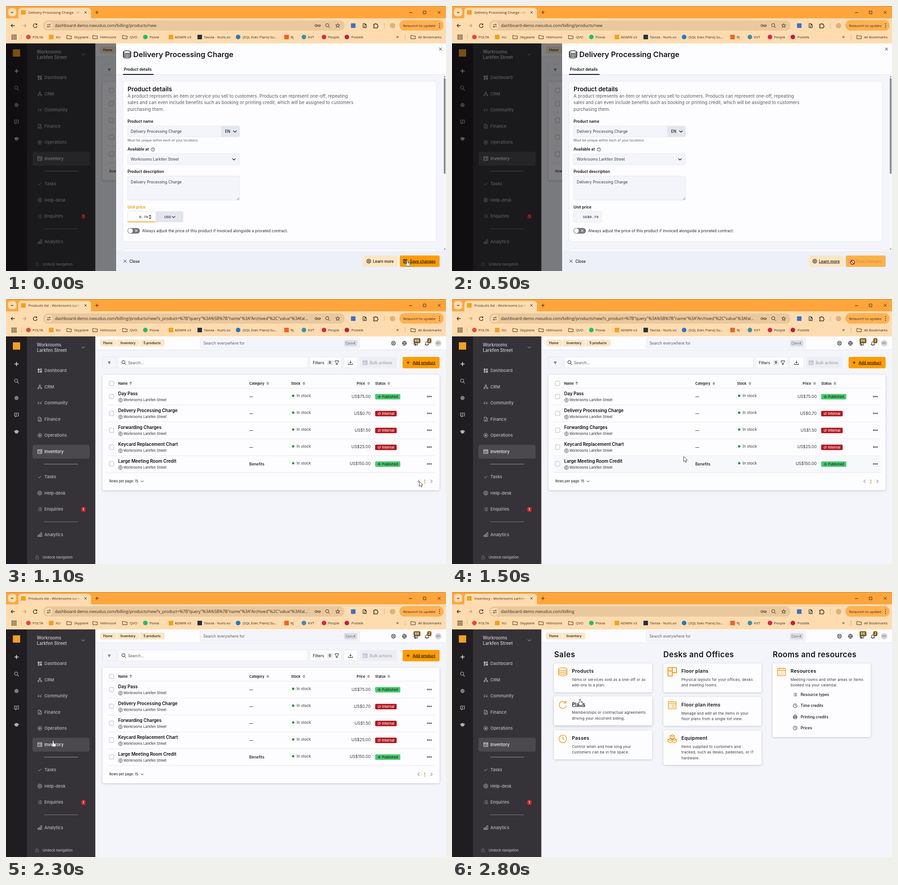
An HTML page that plays this animation: 963x581 px, repeating every 3 s.

```html
<!DOCTYPE html>
<html lang="en">
<head>
<meta charset="utf-8">
<title>Dashboard</title>
<style>
html, body { margin: 0; width: 100%; height: 100%; overflow: hidden; background: #f4f5fb }
svg { display: block; width: 963px; height: 581px }
text { font-family: Inter, sans-serif; white-space: pre }
.ui { font-family: "Open Sans", "Noto Sans", sans-serif }
.mono { font-family: "Liberation Mono", monospace }
.wide { letter-spacing: .025em }
.card { filter: drop-shadow(0 1.5px 2px #0003) }
.lift { filter: drop-shadow(0 2.5px 3px #0003) }
</style>
</head>
<body>
<svg id="stage" viewBox="0 0 963 581"></svg>
<script>
const LOOP = 3000, STEP = 100;
const SAVING = 200, SAVED = 600, INVENTORY = 2400, RETITLED = 2500;
const INK = '#141316', GREY = '#5c5b60', ORANGE = '#ff9d00', WHITE = '#fdfcff', PAGE = '#f4f5fb', EDGE = '#e3e4ea', BAR = '#ffdcb0';
const SITE = 'Workrooms Larkfen Street';

// y is the middle of the capitals
const text = (x, y, s, size, fill = INK, weight = 400, more = '') =>
  `<text x="${x}" y="${y + size * .364}" font-size="${size}" fill="${fill}" font-weight="${weight}" ${more}>${s}</text>`;
const ui = (x, y, s, size, fill = '#38291a') => text(x, y, s, size, fill, 400, 'class="ui"');
const rect = (x, y, w, h, fill, r = 0, more = '') =>
  `<rect x="${x}" y="${y}" width="${w}" height="${h}" fill="${fill}" rx="${r}" ${more}/>`;
const box = (x, y, w, h, fill = PAGE, r = 3) => rect(x, y, w, h, fill, r, `stroke="${EDGE}" stroke-width=".8"`);
const circle = (x, y, r, fill, more = '') => `<circle cx="${x}" cy="${y}" r="${r}" fill="${fill}" ${more}/>`;
const line = (d, stroke = INK, width = 1, fill = 'none') =>
  `<path d="${d}" stroke="${stroke}" stroke-width="${width}" fill="${fill}" stroke-linejoin="round"/>`;
const ring = r => `M${-r} 0a${r} ${r} 0 1 0 ${2 * r} 0a${r} ${r} 0 1 0 ${-2 * r} 0`;
const underline = 'text-decoration="underline"';

const ICONS = {
  grid: 'M-4-4h3v4h-3zM1-4h3v2h-3zM-4 2h3v2h-3zM1 0h3v4h-3z',
  org: 'M-1.5-4h3v2.5h-3zM-4.2 2h2.4v2.4h-2.4zM1.8 2h2.4v2.4h-2.4zM0-1.5v2M-3 2v-1.5h6v1.5',
  quote: 'M-1-3q-3 1-3 4a1.2 1.2 0 1 0 2-1M4-3q-3 1-3 4a1.2 1.2 0 1 0 2-1',
  doc: 'M-3.5-4.5h4l3 3v6h-7zM.5-4.5v3h3M-1.5 1h3M-1.5 3h3',
  dot: ring(4.4) + ring(1.8) + ring(.8),
  table: 'M-4.5-4.2h9v8.4h-9zM-4.5-2h9M-2.8 0h1M-.5 0h3.5M-2.8 2.2h1M-.5 2.2h3.5',
  check: 'M-3.5 0l2.3 2.3l4.6-4.6',
  buoy: ring(4.5) + ring(2) + 'M-3.1-3.1l1.7 1.7M3.1-3.1l-1.7 1.7M-3.1 3.1l1.7-1.7M3.1 3.1l-1.7-1.7',
  list: 'M-4-3h1M-4 0h1M-4 3h1M-1.5-3h5.7M-1.5 0h5.7M-1.5 3h5.7',
  chart: 'M-4.3 4.3v-3h2.4v3zM-1.2 4.3v-5h2.4v5zM1.9 4.3v-8.6h2.4v8.6z',
  lock: 'M-3.5-.5h7v5h-7zM-2-.5v-2a2 2 0 0 1 4 0v2',
  plus: 'M-4.5 0h9M0-4.5v9',
  cross: 'M-3-3l6 6M3-3l-6 6',
  search: 'M-4.5-1a3.5 3.5 0 1 0 7 0a3.5 3.5 0 1 0-7 0M1.5 1.7l3.3 3.3',
  gear: ring(3.4) + ring(1.4) + 'M0-4.6v1.2M0 3.4v1.2M-4.6 0h1.2M3.4 0h1.2M-3.2-3.2l.8.8M3.2 3.2l-.8-.8M-3.2 3.2l.8-.8M3.2-3.2l-.8.8',
  chat: 'M-4.5-4h9v6.5h-4.5l-2 2v-2h-2.5zM-2-1.8h4M-2 .3h2.5',
  cap: 'M-5-1l5-2.2l5 2.2l-5 2.2zM-3 0v2.5q3 1.5 6 0v-2.5',
  down: 'M-3.5-1.7l3.5 3.4l3.5-3.4',
  left: 'M2-3.5l-4 3.5l4 3.5', right: 'M-2-3.5l4 3.5l-4 3.5',
  back: 'M4 0h-8M-.5-3.5l-3.5 3.5l3.5 3.5', next: 'M-4 0h8M.5-3.5l3.5 3.5l-3.5 3.5',
  up: 'M0 3.5v-7M-3-.5l3-3l3 3',
  sort: 'M-2.5-1l2.5-2.5l2.5 2.5zM-2.5 1l2.5 2.5l2.5-2.5z',
  reload: 'M3.3-2.4a4.2 4.2 0 1 0 .8 3.4M3.6-4.6v2.6h-2.6',
  folder: 'M-5-3.5h3.5l1.3 1.3h5.2v6h-10z',
  star: 'M0-4.5l1.3 3h3.2l-2.5 2.1l.9 3.4l-2.9-1.9l-2.9 1.9l.9-3.4l-2.5-2.1h3.2z',
  key: 'M-6 0a2.3 2.3 0 1 0 4.6 0a2.3 2.3 0 1 0-4.6 0M-1.4-1.2h7.4v2.4h-1.5v1h-2v-1h-3.9',
  puzzle: 'M-4.5-3h3a1.5 1.5 0 0 1 3 0h2.5v3a1.5 1.5 0 0 1 0 3v2h-8.5v-2.5a1.5 1.5 0 0 0 0-3z',
  funnel: 'M-4-4h8v1.8l-2.8 2.7v3.5h-2.4v-3.5l-2.8-2.7z',
  filter: 'M-3-2h6M-1.8 0h3.6M-.7 2h1.4',
  load: 'M0-4.5v6M-2.5-1l2.5 2.5l2.5-2.5M-4.5 2v2h9v-2',
  globe: ring(4.5) + 'M-4.5 0h9M0-4.5q-4 4.5 0 9q4-4.5 0-9',
  horn: 'M-4.5-1h3l5-3v8l-5-3h-3zM-3 1l1 3.5h1.5l-.8-3.5',
  bell: 'M-4 2.5q1.3-1 1.3-4a2.7 2.7 0 0 1 5.4 0q0 3 1.3 4zM-1 3.8q1 1 2 0',
  pin: ring(4.3) + 'M0 3q-4-4 0-5.5q4 1.5 0 5.5M-.5-.5h1',
  eye: 'M-4 0q4-5 8 0q-4 5-8 0M-1.2 0a1.2 1.2 0 1 0 2.4 0a1.2 1.2 0 1 0-2.4 0',
  noeye: 'M-4 0q4-5 8 0q-4 5-8 0M-3 3l6-6',
  db: 'M-5-3a5 1.8 0 1 0 10 0a5 1.8 0 1 0-10 0v6a5 1.8 0 0 0 10 0v-6M-5-1a5 1.8 0 0 0 10 0M-5 1a5 1.8 0 0 0 10 0',
  plan: 'M-5-5h10v6h-5v4h-5zM0-5v6M-5-1h5',
  clock: ring(4.5) + 'M0-2.8v2.8l2 1',
  cubes: 'M0-5l2.5 1.2v2.6l-2.5 1.2l-2.5-1.2v-2.6zM-2.5-3.8l2.5 1.2l2.5-1.2M-2.5-.5l2.5 1.2v2.6l-2.5 1.2l-2.5-1.2v-2.6zM2.5-.5l2.5 1.2v2.6l-2.5 1.2l-2.5-1.2v-2.6zM0 .7l-2.5 1.2l-2.5-1.2M5 .7l-2.5 1.2l-2.5-1.2',
  calendar: 'M-4.5-4h9v8.5h-9zM-4.5-1.7h9M-2.3-5v2M2.3-5v2M-2.7.3h1M-.5.3h1M1.7.3h1M-2.7 2.4h1M-.5 2.4h1M1.7 2.4h1',
  printer: 'M-2.7-1v-3.5h5.4v3.5M-2.7 2.5h-1.8v-3.5h9v3.5h-1.8M-2.7 1h5.4v3.5h-5.4z',
  disk: 'M-4-4h6.5l1.5 1.5v6.5h-8zM-2-4v2.5h4v-2.5M-2 4v-3.5h4v3.5'
};
const icon = (name, x, y, color = INK, scale = 1, width = 1, fill = 'none') =>
  `<g transform="translate(${x} ${y}) scale(${scale})">${line(ICONS[name], color, width / scale, fill)}</g>`;

function browser(title, url) {
  const dark = '#3d2c18';
  let s = rect(0, 0, 963, 40, '#ffa53b') + rect(0, 0, 963, 1, '#c98b45') + rect(0, 27, 963, 55, BAR) + rect(27, 4, 159, 30, BAR, 7)
    + rect(4.5, 4.5, 18, 18, BAR, 6) + icon('down', 13.5, 14, dark, .7, 1.2) + rect(33, 9, 10, 10, '#f5a01e')
    + `<g clip-path="url(#tab)">${ui(49, 14, title, 7.85)}</g>` + rect(146, 6, 18, 17, 'url(#fade)')
    + icon('cross', 174, 14, dark, .8) + icon('plus', 199, 14, dark, .8, 1.2)
    + line('M882 14.5h7M913 11h6v6h-6z', dark) + icon('cross', 948, 14, dark)
    + icon('back', 15, 43, dark, 1, 1.3) + icon('next', 40, 43, '#b59a77', 1, 1.2) + icon('reload', 64, 43, dark, 1, 1.3)
    + rect(81, 31.5, 660, 22.5, '#eac89e', 11) + circle(93.5, 43, 8, BAR)
    + line('M89.5 40.7h4M97.7 40.7h0M89.5 45.3h1M94.5 45.3h3.5', dark, 1.1) + circle(95.7, 40.7, 1.4, 'none', `stroke="${dark}"`) + circle(92, 45.3, 1.4, 'none', `stroke="${dark}"`)
    + ui(107, 43, url, 9.05) + icon('key', 682, 43, dark) + icon('search', 704, 43, dark) + icon('star', 726, 43, dark)
    + rect(755, 38, 10, 10, '#3b73c8', 1) + icon('doc', 785, 43, dark, 1, 1.2) + icon('puzzle', 809, 43, dark, 1, 1.3)
    + rect(827.5, 37, 1, 12, '#f0ad5c') + circle(846, 43, 6, '#dfb27c')
    + rect(861, 31, 97, 23, '#ffb152', 11.5) + ui(869, 43, 'Relaunch to update', 7.8)
    + [39, 43, 47].map(y => circle(949, y, 1, dark)).join('')
    + [64, 68, 72].map(y => [13.5, 17.5, 21.5].map(x => rect(x - 1.2, y - 1.2, 2.6, 2.6, dark)).join('')).join('')
    + rect(33, 62, 1, 12, '#f0ad5c') + rect(873, 62, 1, 12, '#f0ad5c') + ui(854, 67, '»', 11) + icon('folder', 891, 68, dark) + ui(902, 68, 'All Bookmarks', 7.7);
  const marks = [
    [49, 58, 'POLTA', '#e5483b', 1], [99, 109, 'XU', '#f5a01e'], [138, 149, 'Skyplank'], [195, 206, 'Hillmoore'], [260, 271, 'QVO'],
    [305, 314, 'Plovia', '#1fbf67', 1], [361, 369.5, 'ADMIN v3', '#f5a01e'], [424, 433, 'Tavola - Nurb.xo', '#26333f'],
    [508, 518, '(SQL Exec Plans) Su...', '#2478c8', 1], [614, 623, 'RJ', '#f06423'], [652, 661, 'KVT', '#3a8fb5', 1],
    [696, 705, 'People', '#d8264a', 1], [746, 756, 'Postelk', '#c01f3c', 1]];
  for (const [x, tx, label, color, round] of marks)
    s += (color ? rect(x - 5, 63, 10, 10, color, round ? 5 : 1) : icon('folder', x, 68, dark)) + ui(tx, 68, label, 7.7);
  return s;
}

function sidebar() {
  const soft = '#b8b7bb';
  let s = rect(0, 82, 46, 499, '#201d21') + rect(46, 82, 149.5, 499, '#353337') + rect(58, 319.5, 125, 30.5, '#4b494d', 4)
    + rect(15, 95, 16, 16, '#f5a01e') + icon('plus', 23, 142.5, '#eee', 1, 1.4)
    + ['search', 'gear', 'chat', 'cap'].map((n, i) => icon(n, 23, 180 + i * 37, soft, 1, 1.1, n == 'cap' ? soft : 'none')).join('')
    + text(67.5, 100, 'Workrooms', 9.7, '#cfced2', 500) + text(67.5, 112, 'Larkfen Street', 9.7, '#cfced2', 500) + icon('down', 169, 106, soft);
  const items = [['grid', 157, 'Dashboard'], ['org', 192.5, 'CRM'], ['quote', 228, 'Community'], ['doc', 263.5, 'Finance'], ['dot', 299, 'Operations'],
    ['table', 334.5, 'Inventory'], ['check', 390, 'Tasks'], ['buoy', 425.5, 'Help-desk'], ['list', 461, 'Enquiries'], ['chart', 516.5, 'Analytics']];
  for (const [name, y, label] of items) {
    const color = label == 'Inventory' ? '#f3f2f5' : soft;
    s += icon(name, 74, y, color, 1, .9, name == 'grid' ? color : 'none') + text(84, y, label, 9.3, color, 500);
  }
  return s + rect(83, 361.5, 75, 1, '#9a999d') + rect(83, 488, 75, 1, '#77767a') + rect(165, 456.5, 9, 10, '#d4262e', 2)
    + text(167.6, 461.5, '1', 7, '#fff', 600) + icon('lock', 68, 566, '#77767a', .9, .9) + text(80, 566, 'Undock navigation', 7.4, soft, 500);
}

function header(crumbs) {
  const spans = [[206, 242], [242, 292], [292, 347]], starts = [212.5, 250.5, 301];
  let s = rect(195, 82, 768, 499, PAGE) + rect(195, 82, 768, 29, WHITE) + rect(195, 111, 768, 1, '#e4e5eb');
  crumbs.forEach((label, i) => {
    const [a, b] = spans[i], end = i == crumbs.length - 1;
    s += rect(a, 89, b - a, 15, '#fde6c4', end || !i ? 4 : 0);
    if (i) s += line(`M${a - 2} 88.5l4 8l-4 8`, WHITE, 1.5);
    s += text(starts[i], 96.7, label, 7.3, INK, 500);
  });
  s += box(425, 85, 349, 23) + text(432, 97, 'Search everywhere for', 8.4, GREY) + rect(740, 90, 29, 14, '#dddee5', 2) + text(743, 97, 'Ctrl+K', 7.3, GREY)
    + icon('buoy', 848, 97) + icon('globe', 872, 97) + icon('horn', 897, 98, INK, .9) + icon('bell', 921, 98)
    + circle(946, 97, 7, '#d7d6db') + text(942, 97, 'KO', 5.5, GREY);
  for (const [x, w, n] of [[892, 15, '66'], [922, 9, '2']])
    s += rect(x, 86, w, 11, '#7d5a12', 3) + text(x + w / 2, 91.5, n, 7.3, '#fff', 600, 'text-anchor="middle"');
  return s;
}

const PRODUCTS = [['Day Pass', '75.00', 1], ['Delivery Processing Charge', '0.70'], ['Forwarding Charges', '1.50'], ['Keycard Replacement Chart', '25.00'], ['Large Meeting Room Credit', '150.00', 1, 'Benefits']];

function productList(rows, cursor) {
  const bottom = 195.5 + rows.length * 36.95;
  const check = y => rect(226, y - 5, 10, 10, WHITE, 2, 'stroke="#a9a9b0" stroke-width=".8"');
  let s = header(['Home', 'Inventory', '5 products'])
    + box(211, 127, 30, 24) + icon('filter', 226, 140) + box(246, 127, 414, 24, WHITE) + icon('search', 258, 139.5) + text(267, 139.5, 'Search...', 8.4, GREY)
    + box(665, 127, 69, 24, WHITE) + text(671.5, 139.5, 'Filters', 8.6) + rect(703, 134, 12, 11, '#e6e7ee', 2) + text(706.5, 139.5, '0', 7.3, INK, 600) + icon('funnel', 724, 139.5)
    + box(739, 127, 31, 24, WHITE) + icon('load', 754, 139.5) + rect(775, 127, 80, 24, '#edeef4', 3) + icon('table', 786, 139.5, '#a7a7ad') + text(796, 139.5, 'Bulk actions', 8.5, '#a2a2a8', 500)
    + rect(868, 127, 81, 25, ORANGE, 3) + icon('plus', 880, 139.5, INK, .7, 1.2) + text(890, 139.5, 'Add product', 8.4, INK, 500, underline)
    + rect(211, 166, 738, bottom - 127, WHITE, 4, 'class="card"') + check(185);
  for (const [x, label, mark] of [[245.5, 'Name', 273], [532.5, 'Category', 573], [624, 'Stock', 652], [767.5, 'Price', 793.5], [808, 'Status', 838]])
    s += text(x, 185, label, 7.35, INK, 600) + icon(label == 'Name' ? 'up' : 'sort', mark, 185, label == 'Name' ? INK : GREY, .9, .8);
  s += rect(221, 195, 718, .8, EDGE);
  rows.forEach(([name, price, live, category = '—'], i) => {
    const top = 195.5 + i * 36.95, y = top + 18.3;
    if (cursor.x > 221 && cursor.x < 939 && cursor.y > top && cursor.y < top + 36.95) s += rect(221, top, 718, 37, '#f7f8fb');
    s += check(y) + text(245.5, y - 6.2, name, 9.7, '#0b0a0c', 600) + icon('pin', 250.5, y + 8, INK, 1, .7) + text(257, y + 7.4, SITE, 7.6, '#2b2a2e')
      + text(532.5, y, category, 8.4, INK, 500) + circle(628.5, y - 1.6, 2.6, '#1f9a35') + text(636, y - 1.5, 'In stock', 8.5, '#3a393d')
      + text(798, y - .4, 'US$' + price, 8.9, '#3a393d', 400, 'text-anchor="end"')
      + rect(808, y - 5.5, live ? 55 : 47, 12, live ? '#4dca70' : '#b2171e', 2) + icon(live ? 'eye' : 'noeye', 817, y + .5, live ? '#0c3a1a' : '#fff', .9, .8)
      + text(823, y + .5, live ? 'Published' : 'Internal', 7.45, live ? '#0c2a14' : '#fff', 500)
      + [923, 926.7, 930.4].map(x => circle(x, y, 1.2, 'none', `stroke="${INK}" stroke-width=".9"`)).join('') + rect(221, top + 36.95, 718, .8, EDGE);
  });
  return s + text(226, bottom + 19.5, 'Rows per page: 15', 7.35) + icon('down', 298, bottom + 19.5, INK, .8)
    + icon('left', 903, bottom + 19.5, GREY) + text(914.5, bottom + 19.5, '1', 8.4, '#c99a00', 600, underline) + icon('right', 931, bottom + 19.5, GREY);
}

const CARDS = [
  [223, 156.5, 63.5, 'db', 'Products', 'Items or services sold as a one-off or as|add-ons to a plan.'],
  [223, 230, 63.5, 'reload', 'Plans', 'Memberships or contractual agreements|driving your recurrent billing.'],
  [223, 303.5, 63.5, 'clock', 'Passes', 'Control when and how long your|customers can be in the space.'],
  [462.5, 156.5, 63.5, 'plan', 'Floor plans', 'Physical layouts for your offices, desks|and meeting rooms.'],
  [462.5, 230, 63.5, 'table', 'Floor plan items', 'Manage and edit all the items in your|floor plans from a single list view.'],
  [462.5, 303.5, 75.5, 'cubes', 'Equipment', 'Items supplied to customers and|tracked, such as desks, pedestals, or IT|hardware.'],
  [701.5, 156.5, 161.5, 'calendar', 'Resources', 'Meeting rooms and other areas or items|booked via your calendar.']];
const within = (p, [x, y, h]) => p.x > x && p.x < x + 215 && p.y > y && p.y < y + h;

function inventory(cursor) {
  let s = header(['Home', 'Inventory']);
  for (const [x, label] of [[223.5, 'Sales'], [462.5, 'Desks and Offices'], [702, 'Rooms and resources']])
    s += text(x, 137, label, 16.8, INK, 600, 'class="wide"');
  for (const card of CARDS) {
    const [x, top, h, name, title, body] = card, hot = within(cursor, card), y = top - (hot ? 1.3 : 0);
    s += rect(x, y, 215, h, WHITE, 3, `class="${hot ? 'lift' : 'card'}"`) + icon(name, x + 19.5, y + 18.5, '#f5a01e', 1.85, name == 'plan' ? 2.2 : 1.5)
      + text(x + 39.5, y + 17, title, 10.6, INK, 600, 'class="wide" ' + (hot ? underline : ''))
      + body.split('|').map((row, i) => text(x + 39.5, y + 35.7 + i * 12.3, row, 8.05, '#3a393d', 400, 'class="wide"')).join('');
  }
  [['list', 'Resource types'], ['clock', 'Time credits'], ['printer', 'Printing credits'], ['clock', 'Prices']].forEach(([name, label], i) =>
    s += icon(name, 751, 225 + i * 24.4, INK, .9, .9) + text(763, 225 + i * 24.4, label, 8.4, INK, 500));
  return s;
}

function drawer(saving) {
  const label = (y, s, color) => text(266, y, s, 8.4, color, 600), field = '#3c3b40';
  return rect(241, 82, 722, 499, PAGE) + rect(241, 82, 722, 68, WHITE) + rect(241, 150, 722, 1, EDGE)
    + icon('db', 265, 106, INK, 1.65, 1.4) + text(278.5, 106.5, 'Delivery Processing Charge', 16.35, INK, 600) + icon('cross', 951, 94.5)
    + text(258, 138.5, 'Product details', 8.4, INK, 600) + rect(256, 149, 67, 2, INK)
    + box(256, 165, 686, 351.5, WHITE) + box(256, 533, 686, 20, WHITE)
    + text(266, 182, 'Product details', 13.4, INK, 600)
    + ['A product represents an item or service you sell to customers. Products can represent one-off, repeating', 'sales and can even include benefits such as booking or printing credit, which will be assigned to customers', 'purchasing them.']
      .map((row, i) => text(266, 197.3 + i * 14.5, row, 9.75, GREY)).join('')
    + label(253, 'Product name') + box(266, 263, 245, 24) + rect(471, 263, 40, 24, '#e4e6ee', 3) + text(273, 275, 'Delivery Processing Charge', 8.5, field)
    + text(479.5, 275, 'EN', 8.4, INK, 500) + icon('down', 501, 275, INK, 1, 1.2) + text(266, 294.5, 'Must be unique within each of your locations', 7.25, GREY)
    + label(314, 'Available at') + circle(321.5, 314.5, 3.8, 'none', `stroke="${INK}" stroke-width=".8"`) + text(319.8, 314.5, '?', 6)
    + box(266, 324, 245, 24) + text(273, 336, SITE, 8.5, field) + icon('down', 499, 336, INK, 1, 1.2)
    + label(363, 'Product description') + box(266, 373, 245, 52.5) + text(273, 386, 'Delivery Processing Charge', 8.5, field) + line('M505.5 425l5-5M508.5 425l2-2', GREY, .8)
    + label(440.5, 'Unit price', saving ? INK : '#f39a00')
    + (saving
      ? box(266, 450, 61, 24) + text(286.5, 462.5, 'US$0.70', 8.1, INK, 400, 'class="mono"')
      : box(266, 450, 61, 24, WHITE) + rect(266, 472.5, 61.5, 1.5, ORANGE) + text(291.5, 462.5, '0.70', 8.1, INK, 400, 'class="mono"')
        + line('M312.5 461l2.7-3l2.7 3zM312.5 464l2.7 3l2.7-3z', GREY, .6, GREY)
        + rect(328, 450, 60, 24, '#e4e6ee', 3) + line('M331.5 450v24M384 450v24', '#d3d5de', .8) + text(346.5, 462.5, 'USD', 8.1, INK, 400, 'class="mono"') + icon('down', 367, 462.5, INK, 1, 1.1))
    + rect(266, 486.7, 27, 12.3, '#77767b', 6.1) + circle(272.3, 492.8, 5.2, '#fff') + icon('cross', 285, 492.8, '#fff', .9)
    + text(298, 493, 'Always adjust the price of this product if invoiced alongside a prorated contract.', 8.45, '#2b2a2e')
    + rect(957, 151, 6, 386, '#f7f7fa') + rect(958, 158, 4, 210, '#8e8e92', 2) + line('M958 156l2-3l2 3zM958 532l2 3l2-3z', '#8e8e92', .3, '#8e8e92')
    + rect(241, 537, 722, 44, '#eef0f9') + icon('cross', 260.5, 559.5) + text(270, 559.5, 'Close', 8.4, INK, 500)
    + rect(781, 547, 76, 25, '#fde6c4', 3) + icon('buoy', 794, 559.5) + text(803, 559.5, 'Learn more', 8.4, INK, 500, saving ? underline : '')
    + rect(862, 547, 87, 25, saving ? '#fbb149' : ORANGE, 3) + icon('disk', 874, 559.5, saving ? '#d6953f' : INK)
    + text(884, 559.5, 'Save changes', 8.4, saving ? '#cf9140' : INK, 500, saving ? '' : underline);
}

const PATH = [[0, 878, 557], [600, 874, 557], [700, 874, 557], [1200, 912, 360], [1500, 507, 345], [1800, 98, 319], [2000, 92, 326], [2400, 107, 326], [2800, 280, 235], [LOOP, 280, 235]];
function cursorAt(t) {
  const i = PATH.findIndex(p => p[0] > t), [t0, x0, y0] = PATH[i - 1], [t1, x1, y1] = PATH[i], k = (t - t0) / (t1 - t0);
  return { x: x0 + (x1 - x0) * k, y: y0 + (y1 - y0) * k };
}
function pointer({ x, y }, kind) {
  const shape = kind == 'wait' ? circle(2, 5, 4.4, '#fff', 'stroke="#c3141c" stroke-width="1.8"') + line('M-1 2l6 6', '#c3141c', 1.6)
    : kind == 'hand' ? line('M-1.3 1a1.3 1.3 0 0 1 2.6 0v4l4 .8q1.5.4 1.2 2l-.8 4.2q-.3 1.5-1.8 1.5h-3.4q-1.2 0-2-1l-3-4.2q.8-1.5 2.2-.4l1 .8zM2.6 5.5v2M4.4 6v2', '#222', .8, '#fff')
    : line('M0 0v11.5l2.7-2.4l1.8 4l1.8-.8l-1.8-3.9h3.6z', '#222', .8, '#fff');
  return `<g transform="translate(${x} ${y})">${shape}</g>`;
}

const DEFS = `<defs><clipPath id="tab"><rect x="49" y="4" width="114" height="22"/></clipPath>
<linearGradient id="fade"><stop stop-color="${BAR}" stop-opacity="0"/><stop offset="1" stop-color="${BAR}"/></linearGradient></defs>`;

function scene(t) {
  const cursor = cursorAt(t), saving = t >= SAVING, saved = t >= SAVED, onInventory = t >= INVENTORY;
  const title = (!saved ? 'Delivery Processing Charge' : t < RETITLED ? 'Products list' : 'Inventory') + ' - ' + SITE;
  const url = 'dashboard-demo.nexudus.com/billing' + (onInventory ? '' : '/products/new')
    + (saved && !onInventory ? '?s_product=%7B"query"%3A%5B%7B"name"%3A"Archived"%2C"value"%3Afal...' : '');
  const rows = saved ? PRODUCTS : PRODUCTS.filter((_, i) => i != 1);
  const overLink = cursor.x > 58 && cursor.x < 183 && cursor.y > 318 && cursor.y < 350 || onInventory && CARDS.some(c => within(cursor, c));
  const kind = !saving || overLink ? 'hand' : saved ? 'arrow' : 'wait';
  return DEFS + (onInventory ? inventory(cursor) : productList(rows, cursor)) + sidebar()
    + (saved ? '' : rect(0, 82, 963, 499, '#000', 0, 'opacity=".5"') + drawer(saving))
    + browser(title, url) + pointer(cursor, kind);
}

const stage = document.getElementById('stage');
let shown = -1;
function play(now) {
  const t = Math.floor(now % LOOP / STEP) * STEP;
  if (t != shown) stage.innerHTML = scene(shown = t);
  requestAnimationFrame(play);
}
play(performance.now());
</script>
</body>
</html>
```
